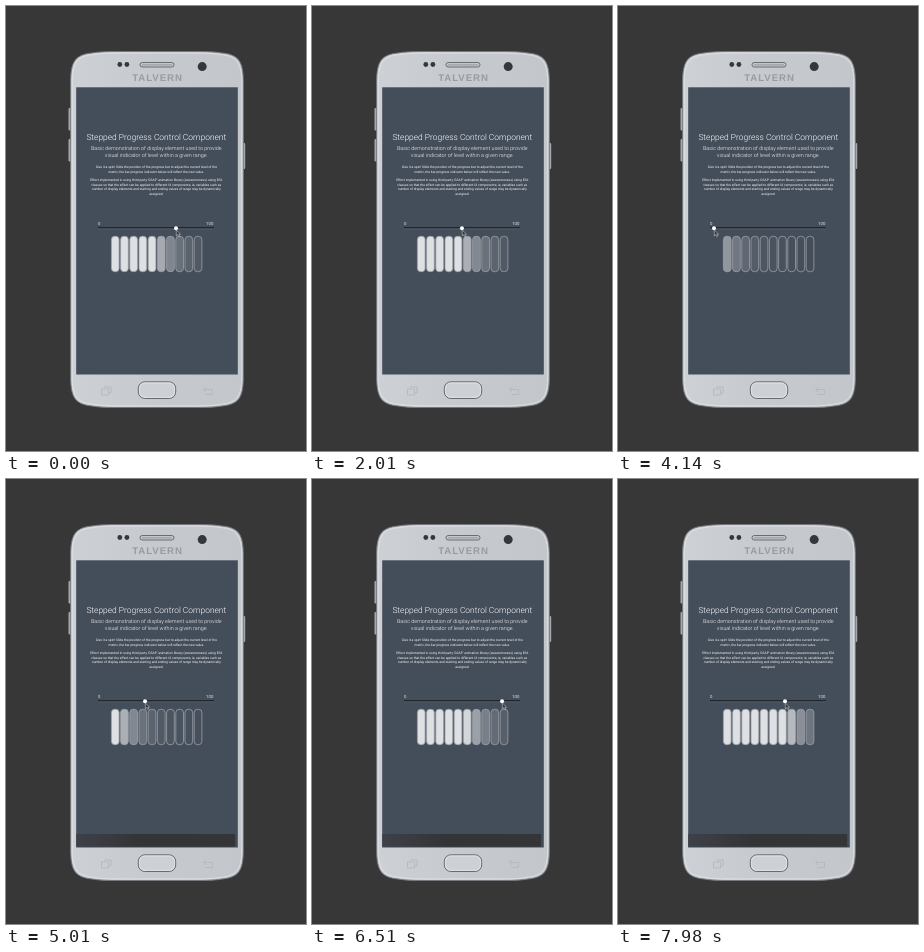
An HTML page that plays this animation: 300 by 445 pixels, repeating every 8000 ms.

```html
<!DOCTYPE html>
<html lang="en">
<head>
<meta charset="utf-8">
<title>Stepped Progress Control</title>
<style>
  html, body { margin: 0; width: 100%; height: 100%; overflow: hidden; background: #373737; }
  svg { display: block; width: 100vw; height: 100vh; }
  text { font-family: Roboto, sans-serif; fill: #fff; text-anchor: middle; text-rendering: geometricPrecision; }
  .title { font-size: 8.44px; font-weight: 300; }
  .sub { font-size: 5.4px; font-weight: 300; }
  .note { font-size: 3.3px; }
  .num { font-size: 4.3px; fill: #dfe2e6; }
  .brand { font: bold 9.7px "Liberation Sans", Arial, sans-serif; fill: #989ca1; letter-spacing: .9px; }
</style>
</head>
<body>
<svg viewBox="0 0 300 445">
  <defs>
    <linearGradient id="metal">
      <stop offset="0" stop-color="#cdd0d5"/>
      <stop offset=".5" stop-color="#c6c9ce"/>
      <stop offset="1" stop-color="#c3c7cc"/>
    </linearGradient>
    <linearGradient id="shade">
      <stop offset="0" stop-color="#3d4148"/>
      <stop offset=".4" stop-color="#333436"/>
      <stop offset="1" stop-color="#343537"/>
    </linearGradient>
    <path id="shell" d="M64.700 75C64.700 55 70 48.500 86 47Q94 45.500 110 45.500H192Q208 45.500 216 47C232 48.500 237.300 55 237.300 75V372
      C237.300 392 232 398.500 216 400Q208 401.500 192 401.500H110Q94 401.500 86 400C70 398.500 64.700 392 64.700 372Z"/>
  </defs>
  <rect width="300" height="445" fill="#373737"/>

  <g fill="#a4a8ad">
    <rect x="62.5" y="102" width="3" height="22.500" rx="1"/>
    <rect x="62.5" y="133" width="3" height="22.500" rx="1"/>
    <rect x="236.5" y="137" width="2.700" height="26" rx="1"/>
  </g>
  <use href="#shell" fill="url(#metal)" stroke="#74787d"/>
  <use href="#shell" fill="none" stroke="#e3e5e8" stroke-width=".8" transform="translate(151 223.500) scale(.982 .991) translate(-151 -223.500)"/>
  <g fill="#34373b">
    <circle cx="113.8" cy="58.5" r="2.4"/>
    <circle cx="120.9" cy="58.5" r="2.4"/>
    <circle cx="196.2" cy="60.600" r="4.500"/>
  </g>
  <rect x="134" y="56.5" width="34" height="4.500" rx="2.200" fill="#c3c6ca" stroke="#54585c" stroke-width=".8"/>
  <path d="M136.500 58.800H166" stroke="#777b80" stroke-width="1.200" stroke-dasharray="1 1"/>
  <text class="brand" x="151.5" y="75.2">TALVERN</text>
  <rect x="132.3" y="375.8" width="37.400" height="16.700" rx="6.500" fill="#cdd0d5" stroke="#686c71"/>
  <rect x="133.500" y="377" width="35" height="14.300" rx="5.500" fill="none" stroke="#e6e8eb" stroke-width=".7"/>
  <g fill="none" stroke="#b2b6bb" stroke-width=".8">
    <path d="M95.500 383h7v6h-7zM98 381h7v6h-2"/>
    <path d="M200 381l-2.500 2.500 2.500 2.500M197.500 383.500h9v5h-7"/>
  </g>

  <rect x="70.2" y="81.3" width="161.600" height="287.200" fill="#444d5a"/>
  <rect id="strip" x="70.2" y="355" width="159" height="12.700" fill="url(#shade)"/>
  <g id="copy"></g>
  <text class="num" x="93.3" y="219">0</text>
  <text class="num" x="203.7" y="219">100</text>
  <path d="M92 221.7H208" stroke="#22262b" stroke-width="1.500"/>
  <path d="M92 222.800H208" stroke="#69717b" stroke-width=".5"/>
  <g id="bars"></g>
  <g id="knob">
    <circle cy="222.200" r="2" fill="#fff"/>
    <path d="M.3 224v5.800l1.400-1.200 1 2 1-.5-1-2h1.800z" fill="#30343a" stroke="#d9dcdf" stroke-width=".5"/>
  </g>
</svg>
<script>
const $ = id => document.getElementById(id);
const add = (parent, tag, attrs) => {
  const el = document.createElementNS("http://www.w3.org/2000/svg", tag);
  for (const key in attrs) el.setAttribute(key, attrs[key]);
  return parent.appendChild(el);
};

const copy = [
  ["title", 134, "Stepped Progress Control Component"],
  ["sub", 144.2, "Basic demonstration of display element used to provide"],
  ["sub", 151, "visual indicator of level within a given range."],
  ["note", 161.7, "Give it a spin! Slide the position of the progress bar to adjust the current level of the"],
  ["note", 167, "metric, the bar progress indicator below will reflect the new value."],
  ["note", 175.2, "Effect implemented in using third party 'GSAP' animation library (awesomeness) using ES6"],
  ["note", 179.8, "classes so that the effect can be applied to different UI components; ie, variables such as"],
  ["note", 184.4, "number of display elements and starting and ending values of range may be dynamically"],
  ["note", 189, "assigned."]
];
for (const [style, y, words] of copy)
  add($("copy"), "text", { class: style, x: 150.3, y }).textContent = words;

const bars = Array.from({ length: 10 }, (_, i) => add($("bars"), "rect", {
  x: 105.4 + i * 9.2, y: 230.3, width: 7.7, height: 35.4, rx: 3.4,
  fill: "#f4f5f6", stroke: "#9ca1a8", "stroke-width": .8
}));

// [time in ms, value]
const knobPath = [[0, 170], [1290, 172], [1440, 172], [1470, 170], [1800, 170], [2010, 150],
  [3090, 104.5], [3600, 96], [4200, 96], [5010, 139], [5910, 167], [6900, 205],
  [7200, 205], [7470, 195], [7980, 167]];
const levelPath = [[0, 4.1], [1290, 5.5], [1800, 5.5], [2010, 4.2], [3090, .2], [4200, -1.5],
  [5010, .2], [5910, 3], [7140, 6.8], [7440, 7.4], [7980, 6.4]];

function at(path, t) {
  const n = path.findIndex(key => key[0] > t);
  if (n < 0) return path[path.length - 1][1];
  const [t0, a] = path[n - 1], [t1, b] = path[n];
  return a + (b - a) * (t - t0) / (t1 - t0);
}

function draw(now) {
  const t = now % 8000, level = at(levelPath, t);
  $("knob").setAttribute("transform", `translate(${at(knobPath, t)})`);
  $("strip").style.visibility = t < 4230 ? "hidden" : "visible";
  bars.forEach((bar, i) =>
    bar.setAttribute("fill-opacity", .88 * Math.min(1, Math.exp(.5 * (level - i)))));
  requestAnimationFrame(draw);
}
draw(performance.now());
</script>
</body>
</html>
```
